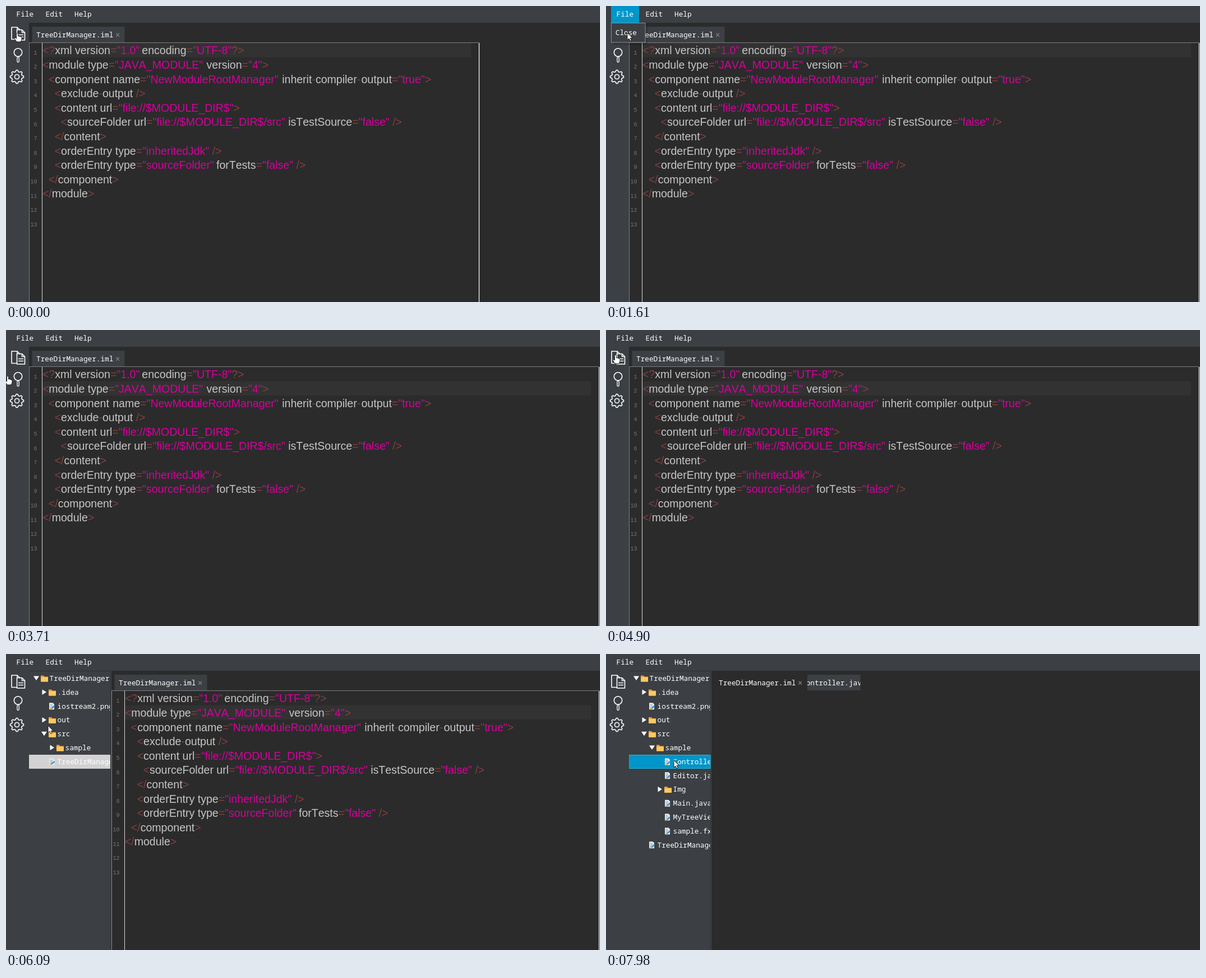
An HTML page for the animation above (8000 ms loop, 1059x529 px).

```html
<!DOCTYPE html>
<html lang="en">
<head>
<meta charset="utf-8">
<title>Editor</title>
<style>
  html, body { margin: 0; width: 100%; height: 100%; overflow: hidden; background: #2b2b2b; }
  svg { display: block; width: 1059px; height: 529px; }
  text { white-space: pre; }
  .ui { font: 12.73px "Noto Sans Mono", "DejaVu Sans Mono", monospace; fill: #fff; }
  .code { font: 19.55px "Liberation Sans", Arial, sans-serif; font-kerning: none; fill: #c6c6c6; }
  .num { font: 10px "Liberation Mono", monospace; fill: #747474; text-anchor: end; }
  .icon { fill: none; stroke: #fff; stroke-width: 1.6; stroke-linejoin: round; stroke-linecap: round; }
</style>
</head>
<body>
<svg id="stage" viewBox="0 0 1059 529"></svg>
<script>
const LOOP = 8000, STEP = 70;
const PANEL = "#3c3f43", DARK = "#2b2b2b", BLUE = "#0096c9";
const TREE_W = 147, ROW = 24.8, LINE = 25.6;
const stage = document.getElementById("stage");

function el(parent, name, attrs = {}, text) {
  const node = document.createElementNS("http://www.w3.org/2000/svg", name);
  for (const key in attrs) node.setAttribute(key, attrs[key]);
  if (text !== undefined) node.textContent = text;
  parent.appendChild(node);
  return node;
}
const group = (parent, attrs) => el(parent, "g", attrs);
const rect = (parent, x, y, width, height, fill, more) =>
  el(parent, "rect", { x, y, width, height, fill, ...more });
const label = (parent, x, y, text) => el(parent, "text", { x, y, class: "ui" }, text);
const path = (parent, d, more) => el(parent, "path", { d, ...more });
const show = (node, on) => node.setAttribute("display", on ? "inline" : "none");
const move = (node, x, y) => node.setAttribute("transform", `translate(${x} ${y})`);

const defs = el(stage, "defs");
function clip(id, x, y, width, height) {
  return rect(el(defs, "clipPath", { id }), x, y, width, height, "#000");
}
clip("treeClip", 40, 30, 145.5, 499);
const tabClip = clip("tabClip", 359, 37, 94, 28);

// Editor
rect(stage, 0, 0, 1059, 529, DARK);
const editor = group(stage);
const tabBox = rect(editor, 46.5, 37, 165, 28.5, PANEL);
label(editor, 54, 56, "TreeDirManager.iml");
path(editor, "M196.3 48.6l5.6 6M201.9 48.6l-5.6 6", { stroke: "#8a8a8a", "stroke-width": 1.2 });

const page = group(stage);
const highlight = rect(page, 65, 66, 764, 25.6, "#323232");
const topLine = path(page, "", { stroke: "#7d7d7d", fill: "none" });
const rightLine = path(page, "M0 66V529", { stroke: "#e8e8e8", "stroke-width": 1.4 });
const body = group(page);
path(body, "M41.5 65V529", { stroke: "#7d7d7d" });
path(body, "M64.5 66V529", { stroke: "#d8d8d8" });

// Each line is a list of [x, text] runs.
const LINES = [
  [[64.9, '<?xml version="1.0" '], [242.3, 'encoding="UTF-8"?>']],
  [[64.9, '<module type="JAVA_MODULE" '], [357.6, 'version="4">']],
  [[75.8, '<component '], [190.2, 'name="NewModuleRootManager" '],
    [492.2, 'inherit-compiler-'], [633.5, 'output="true">']],
  [[86.7, '<exclude-output />']],
  [[86.7, '<content url="file://$MODULE_DIR$">']],
  [[97.5, '<sourceFolder url="file://$MODULE_DIR$/src" isTestSource="false" />']],
  [[86.7, '</content>']],
  [[86.7, '<orderEntry type="inheritedJdk" />']],
  [[86.7, '<orderEntry type="sourceFolder" '], [375, 'forTests="false" />']],
  [[75.8, '</component>']],
  [[64.9, '</module>']]
];
function tokenColor(token) {
  if (token[0] === '"') return "#d6009c";
  return /[<>\/=?-]/.test(token) ? "#843f3f" : "#c6c6c6";
}
LINES.forEach((runs, i) => {
  for (const [x, text] of runs) {
    const line = el(body, "text", { x, y: 86.4 + i * LINE, class: "code" });
    for (const token of text.match(/"[^"]*"|[<>\/=?-]+|[^"<>\/=?-]+/g))
      el(line, "tspan", { fill: tokenColor(token) }, token);
  }
});
for (let i = 0; i < 13; i++)
  el(body, "text", { x: 55.5, y: 86.6 + i * LINE, class: "num" }, i + 1);

// Tab being opened
const newTab = group(stage, { "clip-path": "url(#tabClip)" });
rect(newTab, 359, 37, 150, 28, PANEL);
const newTitle = label(newTab, 406, 56, "Controller.java");
newTitle.setAttribute("text-anchor", "middle");

// Project tree
const tree = group(stage);
rect(tree, 40, 30, 148, 499, PANEL);
path(tree, "M40 30.5H187M40.5 30V529M186.5 30V529", { stroke: "#2e3033", fill: "none" });
rect(tree, 187, 30, 1, 499, "#44474a");
const graySel = rect(tree, 40, 180, 146, 25, "#d2d2d2");
const focusBox = rect(tree, 41.5, 330, 144, 22.5, "none", { stroke: "#2a9fc4" });
const blueSel = rect(tree, 41, 180.5, 145, 24, BLUE, { stroke: "#25b6e2" });
const rows = group(tree, { "clip-path": "url(#treeClip)" });

function folderIcon(g) {
  path(g, "M0 -5h5l1.5 2H13V6H0z", { fill: "#e8a33a" });
  rect(g, 0, -2, 13, 8, "#ffc861", { rx: 1 });
}
function fileIcon(g) {
  path(g, "M1 -6H7.5L10 -3.5V6H1z", { fill: "#e9eef3" });
  path(g, "M2.5 -3h4M2.5 -.8h5M2.5 1.4h4", { stroke: "#7f9cb8" });
  path(g, "M5 4.5L10.3 -.2", { stroke: "#2f8fd8", "stroke-width": 2.4 });
  rect(g, 2, 3, 3, 2.5, "#e0b050");
}
function addRow(index, depth, name, state) {
  const g = group(rows, { transform: `translate(${14 * depth} ${43.6 + ROW * index})` });
  if (state === "open") path(g, "M49 -4H59L54 3.5z", { fill: "#fff" });
  if (state === "closed") path(g, "M50.5 -5V4.5L58 -.3z", { fill: "#fff" });
  const icon = group(g, { transform: "translate(62 0)" });
  (state ? folderIcon : fileIcon)(icon);
  label(g, 77.5, 4.4, name);
  return g;
}
addRow(0, 0, "TreeDirManager", "open");
addRow(1, 1, ".idea", "closed");
addRow(2, 1, "iostream2.png", null);
addRow(3, 1, "out", "closed");
addRow(4, 1, "src", "open");
const foldedRows = [
  addRow(5, 2, "sample", "closed"),
  addRow(6, 1, "TreeDirManager.iml", null)
];
const unfoldedRows = [
  addRow(5, 2, "sample", "open"),
  addRow(6, 3, "Controller.java", null),
  addRow(7, 3, "Editor.java", null),
  addRow(8, 3, "Img", "closed"),
  addRow(9, 3, "Main.java", null),
  addRow(10, 3, "MyTreeView.java", null),
  addRow(11, 3, "sample.fxml", null),
  addRow(12, 1, "TreeDirManager.iml", null)
];

// Side bar and menu
rect(stage, 0, 30, 41, 499, PANEL);
const gearHover = rect(stage, 0, 107, 39, 39, "#393f43");
const fileHover = rect(stage, 0, 30, 39, 38, "#2c2f32", { rx: 5 });
const icons = group(stage, { class: "icon" });
path(icons, "M18.5 59.5H10V38H20L25 43M20 38V42");
path(icons, "M19.5 42.5H28.5L33.5 47.5V61H19.5zM28.5 42.5V47.5H33.5M22.5 51.5H30.5M22.5 55.5H30.5");
el(icons, "circle", { cx: 21.5, cy: 83, r: 7.2 });
rect(icons, 20, 91, 3.2, 9.5, "none", { rx: 1.5, "stroke-width": 1.3 });
let gear = "";
for (let i = 0; i < 32; i++) {
  const angle = (i - 0.5) * Math.PI / 16, r = i % 4 < 2 ? 12 : 9.3;
  gear += `${i ? "L" : "M"}${19.5 + r * Math.sin(angle)} ${126.5 - r * Math.cos(angle)}`;
}
path(icons, gear + "z");
el(icons, "circle", { cx: 19.5, cy: 126.5, r: 4 });

rect(stage, 0, 0, 1059, 30, PANEL);
const fileMenu = rect(stage, 9, 0, 50, 30, BLUE);
label(stage, 18.5, 19, "File");
label(stage, 70.5, 19, "Edit");
label(stage, 122, 19, "Help");
const popup = group(stage);
rect(popup, 12, 32, 62, 38, "#000", { opacity: 0.15, rx: 3 });
rect(popup, 9.5, 30.5, 60.5, 34.5, PANEL, { stroke: "#8b8d8f" });
label(popup, 16.8, 52, "Close");

// Pointers, with the hot spot at 0,0
const outline = { fill: "#fff", stroke: "#111", "stroke-width": 0.9, "stroke-linejoin": "round" };
const pointer = group(stage);
const shapes = {
  arrow: path(pointer, "M0 0V12.8L3 10L5 14.6L7.2 13.6L5.2 9.2H9.2z", outline),
  hand: path(pointer, "M-1.5 9V1.5Q0 -1 1.5 1.5V6Q3 4.6 4 6.4Q5.5 5.4 6 7.2Q8 6.6 8 8.6V11" +
    "Q8 13.4 6 16H-1Q-3 13 -5 10Q-4.6 7 -1.5 10z", outline),
  beam: path(pointer, "M-3 0H-1Q0 0 0 1V15Q0 16 -1 16H-3M3 0H1Q0 0 0 1M0 15Q0 16 1 16H3",
    { fill: "none", stroke: "#e6e6e6", "stroke-width": 1 })
};
const TRACK = [
  [0, 20, 48], [350, 20, 48], [770, 28, 14], [980, 28, 14], [1050, 27, 14],
  [1260, 28, 14], [1470, 37, 47], [1540, 37, 47], [1610, 38, 48], [1820, 22, 70],
  [2240, 22, 70], [2590, 410, 84], [3080, 243, 100], [3710, 3, 82], [3920, 10, 82],
  [4340, 20, 121], [4410, 20, 121], [4900, 17, 44], [5110, 17, 44], [5880, 74, 112],
  [6580, 78, 164], [6650, 78, 164], [6720, 80, 166], [7070, 80, 166], [7700, 121, 190],
  [LOOP, 121, 190]
];
function pointerAt(t) {
  const i = TRACK.findIndex(key => key[0] > t);
  const [t0, x0, y0] = TRACK[i - 1], [t1, x1, y1] = TRACK[i];
  const k = (t - t0) / (t1 - t0);
  return [x0 + (x1 - x0) * k, y0 + (y1 - y0) * k];
}
function pointerShape(x, y, menuOpen, treeOpen) {
  if (menuOpen || y < 30) return "arrow";
  if (x < 40) return "hand";
  return !treeOpen && x > 65 && y > 66 ? "beam" : "arrow";
}

function draw(time) {
  const t = Math.floor(time / STEP) * STEP;
  const menuOpen = t >= 910 && t < 2310;
  const treeOpen = t >= 5110, unfolded = t >= 7070, opening = t >= 7910;
  const [x, y] = pointerAt(t);
  const left = treeOpen ? TREE_W : 0;
  const right = t < 70 ? 843.5 : 1057.5;

  move(editor, left, 0);
  move(body, left, 0);
  move(rightLine, right, 0);
  topLine.setAttribute("d", `M${41 + left} 65.5H${right}`);
  highlight.setAttribute("x", 65 + left);
  highlight.setAttribute("y", t < 3010 ? 66 : 66 + LINE);
  highlight.setAttribute("width", right - 79.5 - left);
  show(page, !opening);
  show(tabBox, !opening);
  show(newTab, opening);
  const tabWidth = t < 7980 ? 47 : 94.5;
  tabClip.setAttribute("width", tabWidth);
  newTitle.setAttribute("x", 359 + tabWidth / 2);

  show(tree, treeOpen);
  foldedRows.forEach(row => show(row, !unfolded));
  unfoldedRows.forEach(row => show(row, unfolded));
  show(graySel, !unfolded);
  show(focusBox, unfolded && t < 7700);
  show(blueSel, t >= 7700);

  show(fileMenu, menuOpen || (y < 30 && x > 9 && x < 59));
  show(popup, menuOpen);
  show(gearHover, t >= 4200 && t < 5110);
  show(fileHover, treeOpen && x < 39 && y < 68);

  move(pointer, Math.round(x), Math.round(y));
  const shape = pointerShape(x, y, menuOpen, treeOpen);
  for (const name in shapes) show(shapes[name], name === shape);
}

const start = performance.now();
function tick() {
  draw((performance.now() - start) % LOOP);
  requestAnimationFrame(tick);
}
tick();
</script>
</body>
</html>
```
